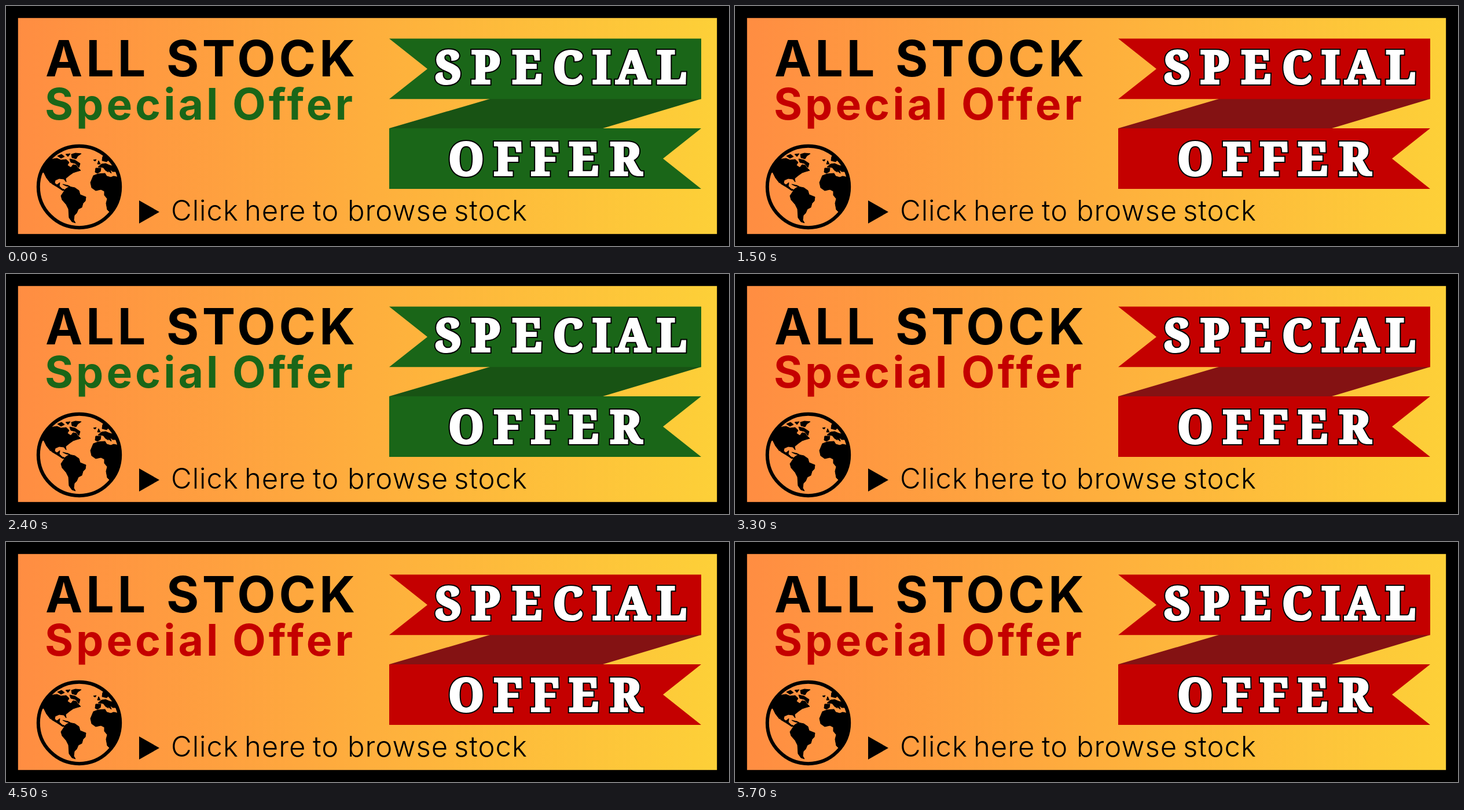
Animation of 1249 by 416 pixels, one loop 6000 ms. Source, as an HTML page:

```html
<!DOCTYPE html>
<html lang="en">
<head>
<meta charset="utf-8">
<title>Special Offer</title>
<style>
  html, body { margin: 0; width: 100%; height: 100%; overflow: hidden; background: #000; }
  svg { display: block; width: 1249px; height: 416px; }
  text { font-family: Inter, "Open Sans", sans-serif; }
  .title { font-size: 86px; font-weight: 750; letter-spacing: 6px; }
  .subtitle { font-size: 75px; font-weight: 700; letter-spacing: 5px; }
  .link { font-size: 49px; font-weight: 350; letter-spacing: 1px; }
  #words text {
    font: 900 78px "Noto Serif", serif;
    text-anchor: middle;
  }
  .outline { fill: #000; stroke: #000; stroke-width: 8px; }
  .face { fill: #fff; stroke: #fff; stroke-width: 4px; }

  .main { animation: main 600ms step-end infinite; }
  .fold { animation: fold 600ms step-end infinite; }
  @keyframes main { 0% { fill: #1a6618; } 50%, 100% { fill: #c40000; } }
  @keyframes fold { 0% { fill: #185314; } 50%, 100% { fill: #841213; } }
</style>
</head>
<body>
<svg viewBox="0 0 1249 416">
  <defs>
    <linearGradient id="warm">
      <stop stop-color="#ff8d42"/>
      <stop offset="1" stop-color="#fdd038"/>
    </linearGradient>
    <clipPath id="disc"><circle cx="126.5" cy="313.5" r="72"/></clipPath>
    <g id="words">
      <text x="764 829 900 971 1029 1083 1150" y="134">SPECIAL</text>
      <text x="795 867 931 998 1071" y="293">OFFER</text>
    </g>
  </defs>

  <rect width="1249" height="416"/>
  <rect x="20.8" y="20.8" width="1207.4" height="374.4" fill="url(#warm)"/>

  <text class="title" y="122"><tspan x="68">ALL</tspan><tspan x="277">STOCK</tspan></text>
  <text class="subtitle main" y="197"><tspan x="67">Special</tspan><tspan x="391">Offer</tspan></text>

  <g class="ribbon">
    <path class="fold" d="M836 161H1201L1031 212H662Z"/>
    <path class="main" d="M662 56.400H1201V161.300H662L728 109ZM662 212H1201L1135 264.500 1201 317H662Z"/>
  </g>
  <g class="lettering">
    <use href="#words" class="outline"/>
    <use href="#words" class="face"/>
  </g>

  <g class="globe">
    <circle cx="126.5" cy="313.5" r="70.700" fill="none" stroke="#000" stroke-width="6"/>
    <g clip-path="url(#disc)" stroke="#000" stroke-linejoin="round">
      <!-- North and Central America -->
      <path d="M57 292L66 276 76 266 88 264 95 267 104 266 109 271 106 276 112 280 116 275 121 276 125 281 129 285 122 287 116 289 109 294 103 299 104 305 100 300 92 299 85 302 84 307 88 310 93 306 92 312 97 317 103 319 98 320 89 314 79 308 74 299 77 307 70 298 65 288Z"/>
      <!-- Arctic and Caribbean islands -->
      <path d="M89 260L96 257 101 261 95 264ZM103 257L111 256 107 261ZM113 257L120 255 130 256 124 260 121 265 114 263ZM110 265L119 267 128 273 126 280 120 273 112 271ZM98 309L107 311 111 313 104 312Z"/>
      <!-- South America -->
      <path d="M103 317L109 313 119 315 126 320 128 327 138 331 137 338 133 342 131 349 125 352 122 359 118 363 117 371 120 376 114 374 109 367 108 352 104 344 97 336 95 329 99 323Z"/>
      <!-- Africa -->
      <path d="M151 294L159 291 171 290 174 295 181 297 186 295 204 299V350L180 358 175 353 173 342 175 334 170 328 170 321 164 318 155 320 148 315 146 306Z"/>
      <!-- Europe -->
      <path d="M155 281L164 281 163 287 158 290 154 288ZM159 279L165 274 172 273 179 276 187 278 192 287 184 287 180 283 182 290 177 286 173 281 177 288 172 285 168 280ZM166 268L167 261 172 257 179 264 174 270ZM158 274L160 268 163 274ZM151 267L156 266 154 269Z"/>
    </g>
  </g>

  <path d="M230 337L265 357 230 377Z"/>
  <text class="link" y="372"><tspan x="285">Click</tspan><tspan x="412">here</tspan><tspan x="530">to</tspan><tspan x="590">browse</tspan><tspan x="774">stock</tspan></text>
</svg>
</body>
</html>
```
